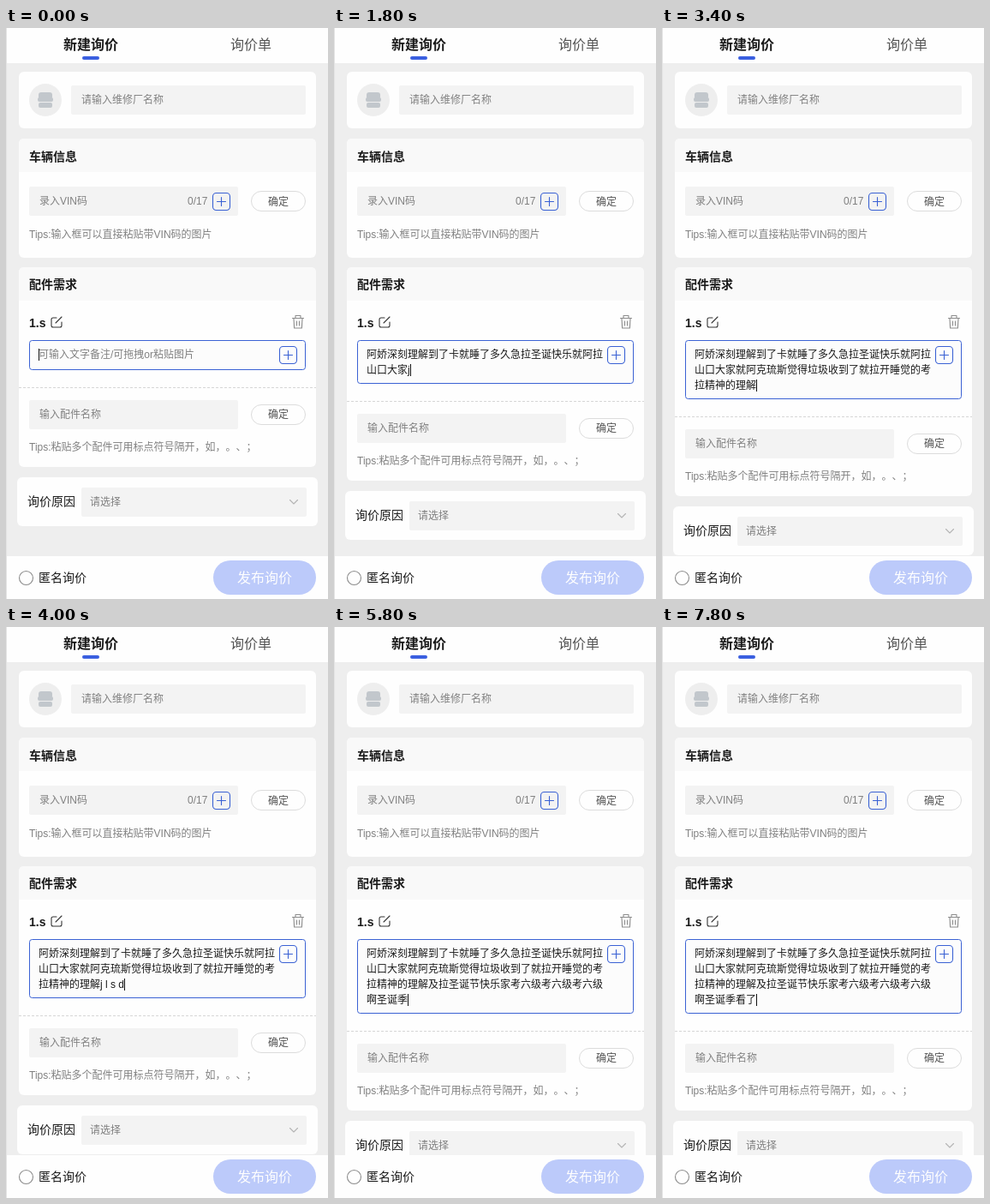
These frames come from a looping animation (376x666 px, 8 s). An HTML page:

```html
<!DOCTYPE html>
<html lang="zh-CN">
<head>
<meta charset="utf-8">
<title>新建询价</title>
<style>
  html, body { margin: 0; width: 100%; height: 100%; overflow: hidden; background: #eee; }
  svg { display: block; font: 12px "Liberation Sans", "Noto Sans CJK SC", "Noto Sans CJK", sans-serif; }
  text { fill: #1a1a1a; white-space: pre; text-spacing-trim: space-all; }
  .hint { fill: #808080; }
  .head { font-size: 14px; font-weight: 700; }
  .label { font-size: 14px; font-weight: 500; }
  .tab { font-size: 16px; }
  .mid { text-anchor: middle; }
  .card { fill: #fefefe; }
  .strip { fill: #f9f9f9; }
  .field { fill: #f3f3f3; }
  .pill { fill: #fefefe; stroke: #dcdcdc; }
  .line { fill: none; stroke: #333; stroke-width: 1.1; stroke-linecap: round; stroke-linejoin: round; }
  .grey { stroke: #8c8c8c; }
  .pale { stroke: #b4b4b4; }
  .blue { stroke: #3b62d4; }
</style>
</head>
<body>
<svg id="stage" width="376" height="666" viewBox="0 0 376 666"></svg>
<script>
const LOOP = 8000, STEP = 200, LEFT = 38, ROW_WIDTH = 278, ROW_HEIGHT = 18;
// Each phrase is composed as pinyin initials, then converted when complete.
const PHRASES = [
  { start: 0, end: 1000, keys: "ajskljdlkjsldj", words: "阿娇深刻理解到了卡就睡了多久" },
  { start: 1000, end: 1700, keys: "jlsdkljalskdj", words: "急拉圣诞快乐就阿拉山口大家" },
  { start: 1700, end: 3300, keys: "jaklsjdljsdljlksjdkljsdlj", words: "就阿克琉斯觉得垃圾收到了就拉开睡觉的考拉精神的理解" },
  { start: 3400, end: 4600, keys: "jlsdjklj", words: "及拉圣诞节快乐家" },
  { start: 4800, end: 5700, keys: "kljkljkljasdj", words: "考六级考六级考六级啊圣诞季" },
  { start: 6000, end: 6800, keys: "kl", words: "看了" }
];
const SHIFTS = [0, 16, 34, 52];

const stage = document.getElementById("stage");
const ruler = document.createElement("canvas").getContext("2d");
ruler.font = getComputedStyle(stage).font;
const widthOf = s => ruler.measureText(s).width;

const rect = (cls, x, y, w, h, r = 0, extra = "") =>
  `<rect class="${cls}" x="${x}" y="${y}" width="${w}" height="${h}" rx="${r}" ${extra}/>`;
const text = (cls, x, y, s, extra = "") => `<text class="${cls}" x="${x}" y="${y}" ${extra}>${s}</text>`;
const path = (cls, d) => `<path class="line ${cls}" d="${d}"/>`;
const strip = (y, h) => `<path class="strip" d="M15 ${y + h}V${y + 6}q0-6 6-6H356q6 0 6 6V${y + h}z"/>`;
const plus = (x, y) => rect("line blue", x + .5, y + .5, 20, 20, 4) +
  path("blue", `M${x + 5.5} ${y + 10.5}h10m-5-5v10`);
const confirm = (y, baseline) => rect("pill", 286.5, y + .5, 63, 23, 11.5) +
  text("mid", 318, baseline, "确定", 'fill-opacity=".75"');

const header = rect("card", 0, 0, 376, 41) +
  text("tab mid", 99, 25, "新建询价", 'font-weight="700"') +
  text("tab mid", 286, 25, "询价单", 'fill-opacity=".75"') +
  rect("", 89, 33, 20, 4, 2, 'fill="#3a5fe0"');

const shop = rect("card", 15, 51, 347, 66, 6) +
  `<circle cx="46" cy="84" r="19" fill="#eee"/>` +
  `<g fill="#c2c7cc">${rect("", 38, 75, 16, 8, 3)}${rect("", 37, 81, 18, 5, 2)}${rect("", 38, 87, 16, 6, 2)}</g>` +
  rect("field", 76, 67, 274, 34, 2) + text("hint", 88, 88, "请输入维修厂名称");

const vehicle = rect("card", 15, 129, 347, 139, 6) + strip(129, 39) +
  text("head", 27, 155, "车辆信息") +
  rect("field", 27, 185, 244, 34, 2) + text("hint", 39, 206, "录入VIN码") +
  text("hint", 212, 206, "0/17") + plus(241, 192) + confirm(190, 207) +
  text("hint", 27, 245, "Tips:输入框可以直接粘贴带VIN码的图片");

const partsTop = strip(279, 39) + text("head", 27, 304, "配件需求") + text("head", 27, 349, "1.s") +
  path("", "M59 338h-4q-2 0-2 2v7q0 2 2 2h8q2 0 2-2v-4M58 344l7-7") +
  path("grey", "M334.5 338.5h13M338 338v-2.5h6v2.5M336 339l.6 11h8.8l.6-11M339.5 342v5m3-5v5");

const below = `<path d="M15 419.5H362" stroke="#d6d6d6" stroke-dasharray="3 2"/>` +
  rect("field", 27, 434, 244, 34, 2) + text("hint", 39, 455, "输入配件名称") + confirm(439, 455) +
  text("hint", 27, 493, "Tips:粘贴多个配件可用标点符号隔开，如，。、；") +
  rect("card", 13, 524, 351, 57, 6) + text("label", 25, 557, "询价原因") +
  rect("field", 88, 536, 263, 34, 2) + text("hint", 98, 557, "请选择") +
  path("pale", "M331.5 550.5l4.5 4.5 4.5-4.5");

const footer = rect("card", 0, 616, 376, 50) +
  `<circle class="line grey" cx="23.5" cy="641.5" r="8"/>` +
  text("label", 38, 646, "匿名询价") +
  rect("", 242, 621, 120, 40, 20, 'fill="#bccafa"') +
  text("tab mid", 302, 647, "发布询价", 'style="fill:#fefefe;font-weight:500"') +
  `<path d="M.5 0V666" stroke="#e4e4e4"/>`;

// Visible pieces of the note: one per converted character or composed key.
function piecesAt(t) {
  return PHRASES.flatMap(({ start, end, keys, words }) => {
    if (t >= end) return [...words];
    const count = Math.floor(keys.length * Math.max(0, t - start) / (end - start));
    return [...keys.slice(0, count)].map((key, i) => i ? " " + key : key);
  });
}

function wrap(pieces) {
  const rows = [""];
  for (const piece of pieces) {
    const last = rows.length - 1;
    if (widthOf(rows[last] + piece) > ROW_WIDTH) rows.push(piece.trim());
    else rows[last] += piece;
  }
  return rows;
}

function noteBox(rows) {
  const last = rows.length - 1;
  const caretX = LEFT + Math.round(widthOf(rows[last]));
  return rect("", 27.5, 364.5, 322, 34 + SHIFTS[last], 3, 'fill="#fcfcfc" stroke="#3b62d4"') +
    (rows[0] ? "" : text("hint", LEFT, 385, "可输入文字备注/可拖拽or粘贴图片")) +
    rows.map((row, i) => text("", LEFT, 385 + i * ROW_HEIGHT, row)).join("") +
    plus(319, 371) + rect("", caretX, 374 + last * ROW_HEIGHT, 1, 14, 0, 'fill="#111"');
}

let lastStep = -1;

function draw(now) {
  const t = Math.floor(now % LOOP / STEP) * STEP;
  if (t !== lastStep) {
    lastStep = t;
    const rows = wrap(piecesAt(t));
    const shift = SHIFTS[rows.length - 1];
    stage.innerHTML = rect("", 0, 0, 376, 666, 0, 'fill="#eee"') + header + shop + vehicle +
      rect("card", 15, 279, 347, 233 + shift, 6) + partsTop + noteBox(rows) +
      `<g transform="translate(0 ${shift})">${below}</g>` + footer;
  }
  requestAnimationFrame(() => draw(performance.now() - start));
}

const start = performance.now();
draw(0);
</script>
</body>
</html>
```
